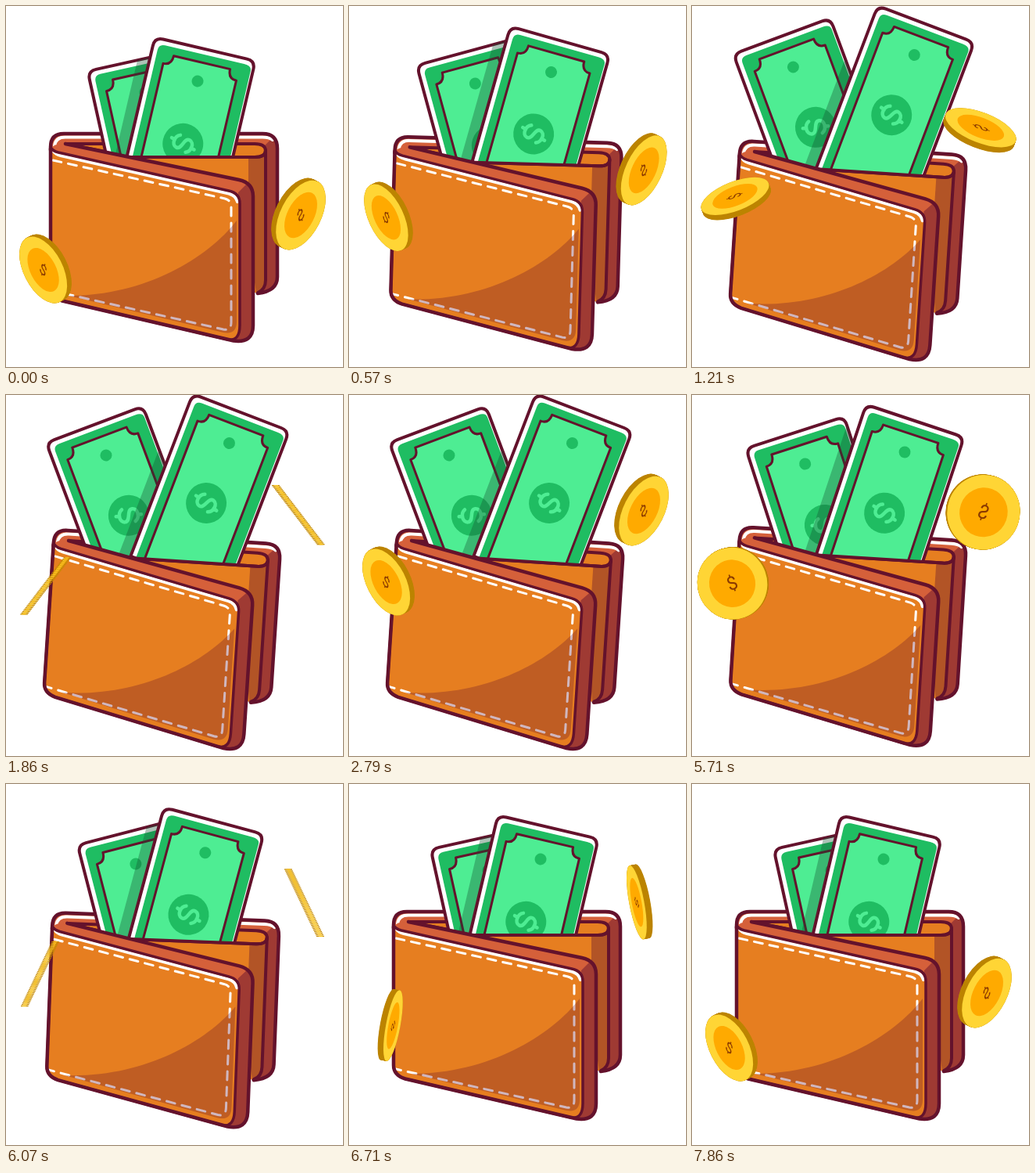
An HTML page with a canvas that plays this animation: 431x461 px, repeating every 9570 ms.

```html
<!DOCTYPE html>
<html>
<head>
<meta charset="utf-8">
<style>
html, body { margin: 0; width: 100%; height: 100%; overflow: hidden; background: #fff; }
canvas { display: block; }
</style>
</head>
<body>
<canvas id="stage" width="431" height="461"></canvas>
<script>
const ctx = document.getElementById('stage').getContext('2d');
const LOOP = 9570, TURN = 5180;
const INK = '#64122c', SHADE = 'rgba(100,18,44,.3)', DEEP = 'rgba(100,18,44,.48)';
const ORANGE = '#e67e20', STRAP = '#d5603a', GREEN = '#1fbd62', MINT = '#4eed93';
const RAD = Math.PI / 180;

const clamp = x => Math.min(1, Math.max(0, x));
const inOut = x => (1 - Math.cos(Math.PI * clamp(x))) / 2;
const out = x => 1 - (1 - clamp(x)) ** 2;
const mix = (a, b, p) => a + (b - a) * p;

// 0 = closed, 1 = open; separate timing for the way out and back
const swing = (t, ease, start, dur, back, backDur) =>
  t < TURN ? ease((t - start) / dur) : 1 - ease((t - back) / backDur);

function fill(path, color) { ctx.fillStyle = color; ctx.fill(path); }
function stroke(path, color, width) {
  ctx.strokeStyle = color;
  ctx.lineWidth = width;
  ctx.stroke(path);
}
function group(draw) { ctx.save(); draw(); ctx.restore(); }

const P = d => new Path2D(d);
const backBody = P('M57 184V180Q57 163 74 163H328Q347 163 347 182V346Q347 364 322 367L300 300L76 190Z');
const backSide = P('M331 178L342 167Q347 172 347 182V346Q347 364 322 367L332 350Z');
const backLight = P('M62 179Q63 167.500 76 167.500H328Q337 167.500 341 171');
const backPanel = P('M150 193H332V350Q332 364 320 366H290V230Z');
const backDark = P('M310 193H332V350Q332 364 320 366L310 300Z');
const panelEdge = P('M332 185V350Q332 362 322 366');
const slot = P('M76 176H318Q332 176 332 185Q332 193 318 193H163Z');
const slotLip = P('M332 184Q332 193 318 193H150');
const strapLine = 'M76 176L298 222Q316 226 316 243V408Q316 431 291 427.500L72 376.500Q57 372 57 359V182';
const strapEdge = P(strapLine);
const strap = P(strapLine + 'Q62 175 76 176Z');
const strapSide = P('M297 238L309 226Q316 232 316 243V408Q316 431 291 427.500L299 405Z');
const face = P('M57 180Q59 185 67 187L285 236Q299 239 299 252V408Q299 428 284 426L72 376.500Q57 372 57 359Z');
const faceLight = P('M61 186Q64 189.500 70 191L285 239.500Q294 242 296 250');
const faceDark = P('M295 274C258 322 178 370 80 370L278 417Q295 420 295 403Z');
const stitch = P('M60 197L280 246Q288 248 288 257V404Q288 415 278 413L60 364');

const note = P('M-66 180V-31Q-66 -42 -55 -42H55Q66 -42 66 -31V180Z');
const noteGreen = P('M-59 180V-27Q-59 -35 -51 -35H53Q63 -35 63 -28V180Z');
const noteInner = P('M-48 180V-12Q-37 -12 -37 -24.500H37Q37 -12 48 -12V180Z');
const dollar = P('M9 -9C4 -16 -9 -14 -9 -6C-9 3 9 -3 9 6C9 14 -4 16 -9 9M0 -18V-13M0 13V18');

function disc(x, y, r, color) {
  ctx.fillStyle = color;
  ctx.beginPath();
  ctx.arc(x, y, r, 0, 7);
  ctx.fill();
}

function place([x, y, angle]) {
  ctx.translate(x, y);
  ctx.rotate(angle * RAD);
}

function drawNote(pose) {
  group(() => {
    place(pose);
    fill(note, '#fff');
    group(() => { ctx.clip(note); fill(noteGreen, GREEN); });
    fill(noteInner, MINT);
    stroke(noteInner, INK, 3);
    disc(0, 0, 7.5, GREEN);
    disc(0, 82, 26, GREEN);
    group(() => {
      place([0, 82, -75]);
      ctx.scale(.9, .9);
      stroke(dollar, MINT, 5);
    });
    stroke(note, INK, 4);
  });
}

function drawNotes(p) {
  const pose = (a, b) => a.map((v, i) => mix(v, b[i], p));
  const rear = pose([178, 110, -12.5], [128, 77, -20.6]);
  const front = pose([245, 96, 13.2], [285.5, 61.5, 21]);
  drawNote(rear);
  group(() => {
    const base = ctx.getTransform();
    place(rear);
    ctx.clip(note);
    ctx.setTransform(base);
    place(front);
    ctx.fillStyle = 'rgba(20,80,50,.35)';
    ctx.fillRect(-81, -60, 15, 300);
  });
  drawNote(front);
}

function drawWallet(t) {
  const turn = swing(t, inOut, 40, 1150, 5560, 1150) * 3.75 * RAD;
  const drop = swing(t, inOut, 40, 1150, 5310, 1300) * 18;
  const lift = swing(t, inOut, 70, 1280, 5210, 1280);
  const pose = () => {
    ctx.translate(200, 234 + drop);
    ctx.rotate(turn);
    ctx.translate(-200, -234);
  };
  ctx.lineJoin = ctx.lineCap = 'round';
  group(() => {
    pose();
    fill(backBody, STRAP);
    fill(backSide, DEEP);
    stroke(backLight, '#fff', 4);
    stroke(backBody, INK, 4.5);
    fill(backPanel, ORANGE);
    fill(backDark, '#b25426');
    fill(slot, ORANGE);
    stroke(slot, INK, 4);
    stroke(panelEdge, INK, 4);
  });
  group(() => {
    const base = ctx.getTransform();
    pose();
    ctx.beginPath();
    ctx.rect(-100, -200, 700, 393);
    ctx.clip();
    ctx.setTransform(base);
    drawNotes(lift);
  });
  group(() => {
    pose();
    stroke(slotLip, INK, 4);
    fill(strap, STRAP);
    fill(strapSide, DEEP);
    fill(face, ORANGE);
    stroke(faceLight, '#fff', 4);
    ctx.setLineDash([11, 9]);
    stroke(stitch, '#fff', 3);
    ctx.setLineDash([]);
    fill(faceDark, SHADE);
    stroke(face, INK, 3.5);
    stroke(strapEdge, INK, 4.5);
  });
}

// Coin tumbling: its normal sweeps a cone around AXIS
const AXIS = [.70, -.30, .64], E1 = [.34, .937, .086], E2 = [-.625, .157, .758];
const blend = (a, x, b, y) => a.map((v, i) => v * x + b[i] * y);
const cross = (a, b) => [
  a[1] * b[2] - a[2] * b[1], a[2] * b[0] - a[0] * b[2], a[0] * b[1] - a[1] * b[0]];

function drawCoin(x, y, size, deg) {
  const ph = (deg % 360 + 360) % 360, c = Math.cos(ph * RAD), s = Math.sin(ph * RAD);
  const bump = (mid, width) => Math.exp(-(((ph - mid) / width) ** 2));
  const tilt = .757 - .3 * bump(300, 25);
  const n = blend(AXIS, tilt, blend(E1, c, E2, s), Math.sqrt(1 - tilt * tilt));
  const side = n[2] < 0 ? -1 : 1, flat = Math.abs(n[2]);
  const angle = Math.atan2(n[1], n[0]), R = 48, HALF = 4;
  const oval = (z, r, color) => {
    ctx.fillStyle = color;
    ctx.beginPath();
    ctx.ellipse(n[0] * z, n[1] * z, r * flat, r, angle, 0, 7);
    ctx.fill();
  };
  group(() => {
    ctx.translate(x, y);
    ctx.scale(size, Math.abs(size));
    ctx.translate(-3 * (1 - c) + 14 * bump(255, 12), 4.5 * (1 - c));
    if (flat < .07) {
      // edge-on, only the stacked layers show
      for (let i = -R; i < R; i += 2.2) {
        const px = -Math.sin(angle) * i, py = Math.cos(angle) * i;
        ctx.fillStyle = '#c48a00';
        ctx.fillRect(px - 5, py, 10, 1.3);
        ctx.fillStyle = '#ffc81f';
        ctx.fillRect(px - 2, py, 5, 1.3);
      }
      return;
    }
    for (let z = -HALF; z <= HALF; z += .5) oval(z * side, R, '#bc8400');
    oval(HALF * side, R, '#ffd535');
    oval(HALF * side, R * .66, '#ffaa00');
    const tan = blend(E1, -s, E2, c), up = cross(n, tan);
    const u = blend(tan, .822, up, -.571), v = blend(tan, -.571, up, -.822);
    ctx.transform(u[0], u[1], v[0], v[1], n[0] * HALF * side, n[1] * HALF * side);
    ctx.fillStyle = '#8a3a00';
    ctx.font = '25px Roboto, sans-serif';
    ctx.textAlign = 'center';
    ctx.textBaseline = 'middle';
    ctx.fillText('$', 0, 1);
  });
}

function drawCoins(t) {
  const deg = 720 * (1 - swing(t, inOut, 432, 2358, 5364, 1720));
  const left = swing(t, out, 70, 1150, 6210, 1150);
  const right = swing(t, out, 250, 1150, 6710, 1150);
  drawCoin(50.5, mix(335.5, 237.5, left), -.96, deg);
  drawCoin(374, mix(265.5, 146.5, right), 1, deg);
}

function frame(now) {
  const t = Math.max(0, now) % LOOP;
  ctx.fillStyle = '#fff';
  ctx.fillRect(0, 0, 431, 461);
  drawWallet(t);
  drawCoins(t);
  requestAnimationFrame(now => frame(now - start));
}
const start = performance.now();
frame(0);
</script>
</body>
</html>
```
